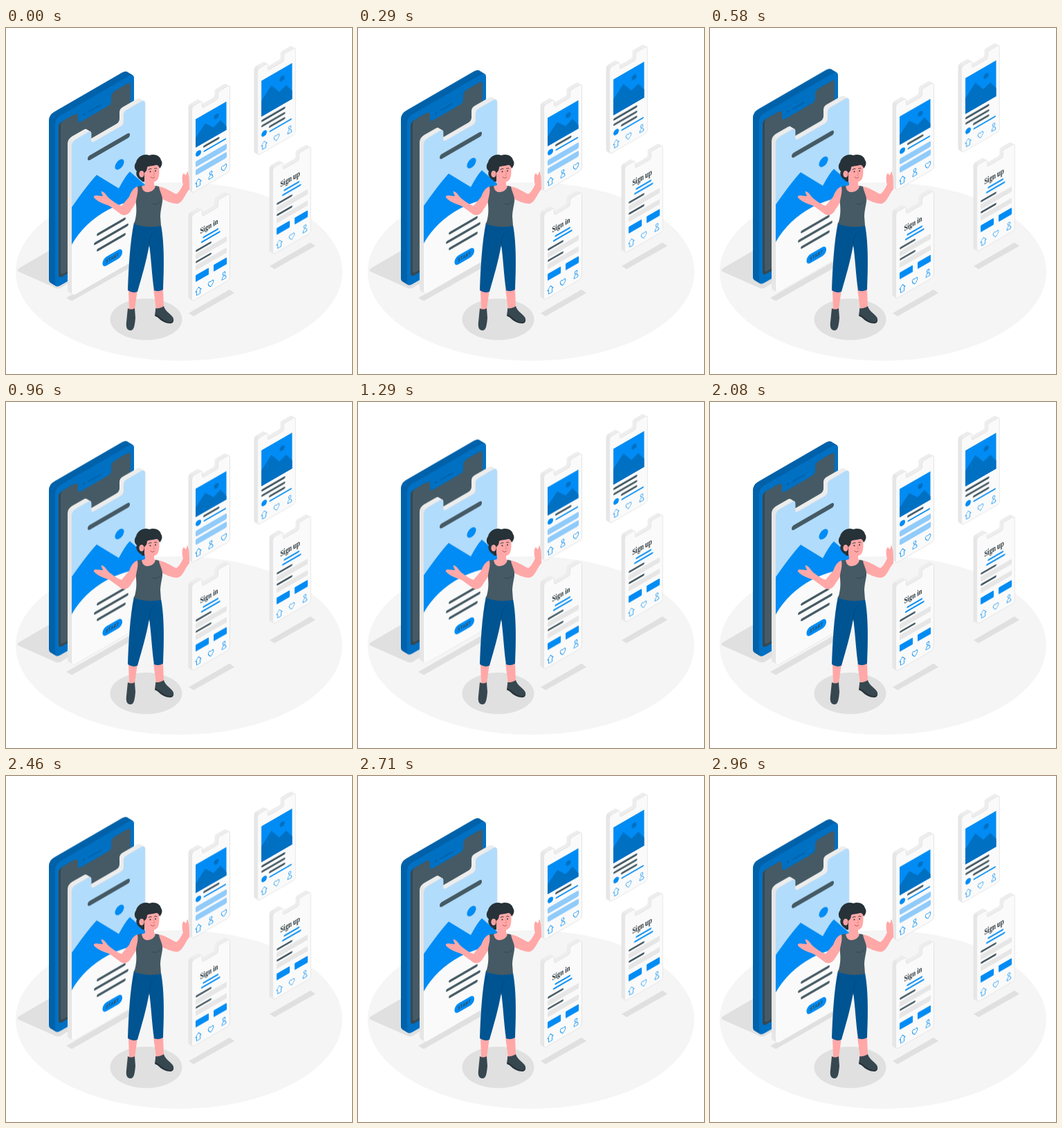
Animation of 500x500 px, one loop 3000 ms. Source, as an HTML page:

```html
<!DOCTYPE html>
<html lang="en">
<head>
<meta charset="utf-8">
<title>App screens</title>
<style>
html, body { margin: 0; width: 100%; height: 100%; overflow: hidden; background: #fff; }
svg { display: block; width: 100vw; height: 100vh; }
.float { animation: float 3s linear infinite; }
@keyframes float { 50% { transform: translateY(-10px); } }
.ln { fill: none; stroke-linecap: round; }
.dark { stroke: #455a64; }
.blue { stroke: #008cf4; }
.icon { fill: none; stroke: #008cf4; stroke-width: .8; stroke-linejoin: round; }
.title { font: bold 11.8px "Liberation Serif", serif; fill: #263238; text-anchor: middle; }
.start { font: bold 7px Lato, sans-serif; letter-spacing: .2px; fill: #37474f; text-anchor: middle; }
</style>
</head>
<body>
<svg viewBox="0 0 500 500">
  <defs>
    <linearGradient id="whiteSide" gradientUnits="userSpaceOnUse" x1="0" x2="5">
      <stop offset=".2" stop-color="#e6e6e6"/><stop offset="1" stop-color="#ededed"/>
    </linearGradient>
    <clipPath id="bigClip"><path id="bigClipPath"/></clipPath>
    <path id="house" d="M5.300 114.500L9.500 109.500L13.700 114.500H12V120H7V114.500Z"/>
    <g id="user"><circle cy="-3" r="1.900"/><path d="M-3 5C-3 -1.200 3 -1.200 3 5Z"/></g>
    <path id="heart" d="M0 5C-6 0 -4 -5 0 -2C4 -5 6 0 0 5Z"/>
  </defs>

  <ellipse cx="250" cy="352" rx="236" ry="129" fill="#f5f5f5"/>
  <g fill="#e0e0e0">
    <path d="M19 347L62 322L130 343L80 375Q75 378 70 375L18 352Q15 350 19 347Z"/>
    <path d="M87 390L95 394.500L205 332L197 327Z"/>
    <path id="slab" d="M264 412L271 416.500L330 383L323 378Z"/>
    <use href="#slab" x="117" y="-68"/>
    <ellipse cx="202.500" cy="421" rx="52" ry="30"/>
  </g>

  <g class="float" id="phones"></g>

  <g id="woman">
    <g fill="#ffa8a7">
      <path d="M177 378H190L186 407H178Z"/>
      <path d="M213 377H227L228 405L217 407Z"/>
      <path d="M192 229C185 229 181 236 178 244L167 257C160 255 151 248 147 244C144 240 141 236 138 236C137 238 140 241 140 243C135 243 130 241 127 243C126 245 129 247 133 250C139 254 146 255 151 258L166 269C171 272 176 270 179 266L190 249Z"/>
      <path d="M219 229C230 230 237 236 246 240C250 238 253 232 256 226C254 221 254 211 257 210L260 213L262 207C265 212 265 224 265 233C259 239 256 252 248 254C239 254 230 249 223 246Z"/>
      <path d="M200 212L201 227Q194 229 192 232L205 242L221 231Q216 228 214 227V218Z"/>
    </g>
    <path fill="#37474f" d="M176 405Q181 408 186 405L187 419C186 430 185 437 180 437C175 437 173 433 174 425Z"/>
    <path fill="#263238" d="M216 408L215 416L219 418C225 424 231 427 238 427Q243 426 242 420Z"/>
    <path fill="#37474f" d="M216 405Q221 406 228 402C230 410 240 414 242 420C242 425 237 426 232 424C226 422 222 416 216 414Z"/>
    <path fill="#005492" d="M185 281Q203 288 224 285C228 305 229 335 227 378Q220 382 214 379C211 360 210 335 207 313C203 337 196 360 190 381Q183 384 176 379C177 350 179 310 185 281Z"/>
    <path class="ln" stroke="#00477d" stroke-width=".9" d="M207 316Q206 304 212 296M186 288Q187 296 183 302"/>
    <path fill="#455a64" d="M190 229L196 228C197 236 202 238 206 237C212 236 215 233 216 228L221 229C222 237 227 242 226 251C225 258 223 265 223 272L224 286Q203 290 185 283C188 274 189 266 188 255C187 246 192 240 190 229Z"/>
    <path class="ln" stroke="#37474f" stroke-width=".8" d="M223 251Q217 257 211 254"/>
    <path fill="#ffa8a7" d="M197 196L220 194C222 203 222 211 220 217C217 224 209 224 205 220C200 222 198 216 197 210Z"/>
    <path fill="#263238" d="M195 220C189 216 187 211 189 207C185 204 185 198 188 194C190 186 199 181 207 184C215 181 223 185 224 191C227 195 225 200 222 203C221 200 220 198 217 198C211 200 206 199 204 201C204 205 202 208 200 209L200 222Q197 223 195 220Z"/>
    <ellipse cx="196" cy="211" rx="3.600" ry="4.800" fill="#ffa8a7"/>
    <path class="ln" stroke="#f27f7f" stroke-width=".8" d="M194.500 209Q197 209 197 213M213 207L215 212L212.500 212.500"/>
    <g fill="#263238"><circle cx="208.500" cy="207.500" r="1"/><circle cx="216" cy="206.500" r="1"/></g>
    <path class="ln" stroke="#263238" stroke-width=".9" d="M206 204.500Q207.500 203 210 203.500M214.500 203Q216.500 202 218 203"/>
    <path class="ln" stroke="#b55b5b" stroke-width="1" d="M209 215.500Q211 218 214.500 216"/>
  </g>
</svg>
<script>
const rect = (x, y, w, h, fill, r = 0) =>
  `<rect x="${x}" y="${y}" width="${w}" height="${h}" rx="${r}" fill="${fill}"/>`;
const line = (x1, x2, y, w, cls) =>
  `<path class="ln ${cls}" stroke-width="${w}" d="M${x1} ${y}H${x2}"/>`;
const dot = (x, y, r, fill) => `<circle cx="${x}" cy="${y}" r="${r}" fill="${fill}"/>`;
const text = (x, y, cls, str, k = .866) =>
  `<text class="${cls}" transform="translate(${x} ${y}) scale(${k} 1)">${str}</text>`;

// Rounded panel with a notch of depth d between a and b in the top edge
function panel(w, h, r, a, b, d) {
  const c = d / 4;
  const notch = a ? `H${a - c}q${c} 0 ${c} ${c}V${d - c}q0 ${c} ${c} ${c}H${b - c}q${c} 0 ${c} ${-c}V${c}q0 ${-c} ${c} ${-c}` : "";
  return `M0 ${r}Q0 0 ${r} 0${notch}H${w - r}Q${w} 0 ${w} ${r}V${h - r}Q${w} ${h} ${w - r} ${h}H${r}Q0 ${h} 0 ${h - r}Z`;
}

// Isometric slab: face at (x, y), thickness running left and up
function slab(x, y, path, depth, side, face, content) {
  let back = "";
  for (let i = depth; i > 0; i -= .5)
    back += `<path d="${path}" fill="${side}" transform="translate(${-i} ${-i * 1.18})"/>`;
  return `<g transform="translate(${x} ${y}) skewY(-30)">${back}` +
    `<path d="${path}" ${face}/>${content}</g>`;
}

const BLUE = "#008cf4", DEEP = "#0070c3", SHADE = "#0062aa", GREY = "#e6e6e6", PALE = "#90cbfa";
const SIDE = "url(#whiteSide)", white = 'fill="#fafafa" stroke="#e0e0e0" stroke-width=".7"';

const device = slab(71, 131, panel(114, 245.5, 8), 9, SHADE, `fill="${DEEP}"`,
  rect(5, 10, 104, 224, "#37474f", 5) + rect(8, 10, 101, 221, "#455a64", 4) +
  `<path fill="${DEEP}" d="M25 9.500H88Q81 10 81 15V21Q81 26 76 26H38Q33 26 33 21V15Q33 10 25 9.500Z"/>` +
  dot(42, 18, 1.5, SHADE) + `<path class="ln" stroke="${SHADE}" stroke-width="2" d="M49 18H65"/>`);

const bigPath = panel(106, 224, 7, 28, 75, 19);
bigClipPath.setAttribute("d", bigPath);
const bigScreen = slab(95, 164, bigPath, 6, SIDE, white,
  `<g clip-path="url(#bigClip)">
    <path fill="#b2dcfc" d="M0 0H106V160H0Z"/>
    <path fill="${BLUE}" d="M0 95Q22 76 36 69L68 107Q78 94 84 92L106 124V160H0Z"/>
    <path fill="#fafafa" d="M0 149Q18 128 52 129Q85 131 106 148V224H0Z"/></g>` +
  line(26.5, 80.5, 38.5, 7, "dark") + dot(69, 73, 6.6, BLUE) +
  line(38, 76, 156, 3.8, "dark") + line(34, 80, 167, 3.8, "dark") + line(38, 76, 178.5, 3.8, "dark") +
  rect(44.5, 195.5, 28.5, 13, BLUE, 6) + text(58.8, 204.6, "start", "START"));

const picture = (y, h, ridge) => rect(5.5, y, 44.5, h, BLUE) + dot(35.5, 34.2, 3.6, DEEP) +
  `<path fill="${DEEP}" d="M5.5 ${y + h}V${ridge}V${y + h}Z"/>`;
const author = y => dot(9.5, y, 4, BLUE) +
  line(18, 38.5, y - 5, 3, "dark") + line(18, 48.5, y + 2, 2, "blue");

const icons = (mid, right) => `<g class="icon"><use href="#house"/>` +
  `<use href="#${mid}" x="27.5" y="114"/><use href="#${right}" x="46.5" y="114"/></g>`;

const post = picture(21, 41, "48L19.5 35L31.5 48L41.5 43L50 57") + author(72.5) +
  rect(5.5, 82, 45, 8.5, PALE, 2) + rect(5.5, 94, 45, 8.5, PALE, 2) + icons("user", "heart");
const article = picture(20, 52, "49L20 35L31.5 51L41.5 47L50 60") +
  line(7, 38.5, 78.3, 3.2, "dark") + line(7, 38.5, 86, 3.2, "dark") + author(98.3) +
  icons("heart", "user");

const field = y => line(7, 27, y, 2.8, "dark") + rect(5.5, y + 4.3, 45, 7.5, GREY, 1);
const form = title => text(25, 34, "title", title, .74) +
  line(17, 37.5, 41.7, 2.2, "blue") + line(14.5, 40, 47.3, 2.2, "blue") +
  field(55.3) + field(71.5) + rect(5.5, 90, 19, 9.8, BLUE, 1) + rect(31.5, 90, 19, 9.8, BLUE, 1) +
  icons("heart", "user");

const smallPath = panel(55, 125, 4, 15, 38, 10.5);
const small = (x, y, content) => slab(x, y, smallPath, 5, SIDE, white, content);

phones.innerHTML = device + bigScreen +
  small(363.5, 59.5, article) + small(268.5, 114, post) +
  small(268.5, 270.5, form("Sign in")) + small(385.5, 202.5, form("Sign up"));
</script>
</body>
</html>
```
